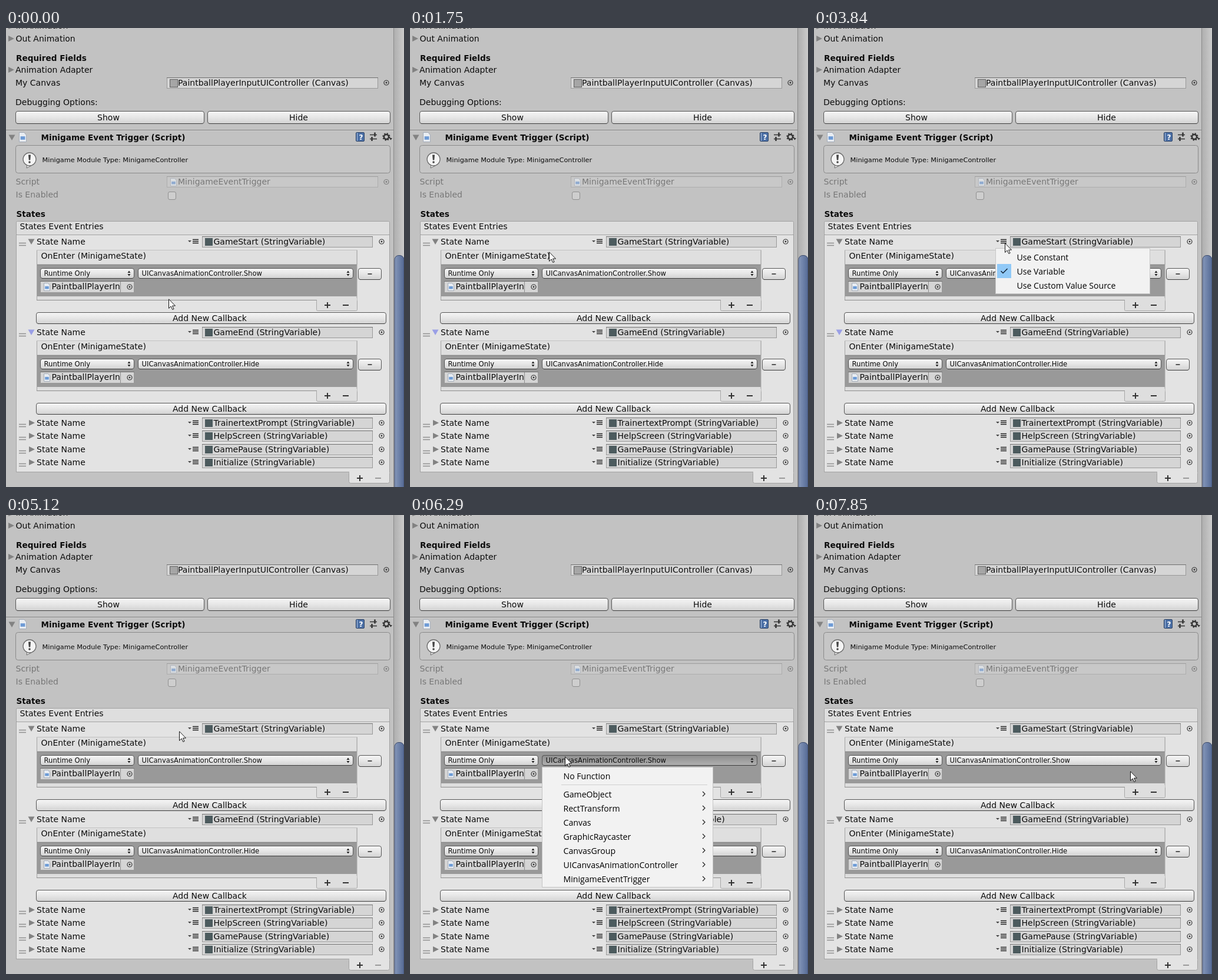
Recreate the animation shown at these times as an HTML page. Size 676 by 780 pixels, loop 8000 ms.

```html
<!DOCTYPE html>
<html lang="en">
<head>
<meta charset="utf-8">
<title>Inspector panel</title>
<style>
  html, body { margin: 0; width: 100%; height: 100%; overflow: hidden; background: #c2c2c2; }
  svg { display: block; width: 676px; height: 780px; }
  text { font: 14px "DejaVu Sans", sans-serif; fill: #0c0c0c; white-space: pre; }
  .bold { font-weight: bold; font-size: 13.6px; }
  .small { font-size: 11.3px; }
  .popup { font-size: 11.6px; }
  .dim { fill: #777; }
  .mid { text-anchor: middle; }
  .menu text { font: 14.1px "Open Sans", sans-serif; fill: #000; }
</style>
</head>
<body>
<svg id="stage" viewBox="0 0 676 780">
  <defs>
    <linearGradient id="btn" x2="0" y2="1">
      <stop offset="0" stop-color="#f6f6f6"/><stop offset=".5" stop-color="#e6e6e6"/><stop offset="1" stop-color="#d2d2d2"/>
    </linearGradient>
    <linearGradient id="down" x2="0" y2="1">
      <stop offset="0" stop-color="#8e8e8e"/><stop offset="1" stop-color="#b0b0b0"/>
    </linearGradient>
    <linearGradient id="track">
      <stop offset="0" stop-color="#adadad"/><stop offset="1" stop-color="#cbcbcb"/>
    </linearGradient>
    <linearGradient id="thumb">
      <stop offset="0" stop-color="#8496b8"/><stop offset=".45" stop-color="#6f83aa"/><stop offset="1" stop-color="#556a94"/>
    </linearGradient>
    <clipPath id="fieldClip"><rect x="58" y="0" width="136" height="780"/></clipPath>
  </defs>
</svg>
<script>
const LOOP = 8000;
const svg = document.getElementById('stage');
let layer = svg;

function add(tag, attrs, content) {
  const el = document.createElementNS('http://www.w3.org/2000/svg', tag);
  for (const k in attrs) el.setAttribute(k, attrs[k]);
  if (content) el.textContent = content;
  layer.append(el);
  return el;
}
function group(attrs, draw) {
  const g = add('g', attrs), outer = layer;
  layer = g;
  draw();
  layer = outer;
  return g;
}
const text = (x, y, s, cls = '', extra = {}) => add('text', { x, y, class: cls, ...extra }, s);
const rect = (x, y, w, h, fill, extra = {}) => add('rect', { x, y, width: w, height: h, fill, ...extra });
const path = (d, fill, extra = {}) => add('path', { d, fill, ...extra });
const line = (d, stroke, width = 1) => path(d, 'none', { stroke, 'stroke-width': width });

// Outlined box given by its outer pixel edges.
const box = (l, t, r, b, fill, stroke, rx = 0) =>
  rect(l + .5, t + .5, r - l - 1, b - t - 1, fill, { stroke, rx });

function button(l, t, r, b, fill = 'url(#btn)') {
  box(l, t, r, b, fill, '#555', 3.5);
  line(`M${l + 3} ${b - .5}H${r - 3}`, '#3c3c3c');
}
function picker(x, y, color = '#333') {
  add('circle', { cx: x, cy: y, r: 4, fill: 'none', stroke: color, 'stroke-width': 1.2 });
  add('circle', { cx: x, cy: y, r: 1.4, fill: color });
}
function field(l, t, r, b, dim) {
  box(l, t, r, b, dim ? '#c8c8c8' : '#d5d5d5', dim ? '#adadad' : '#999');
  line(`M${l} ${t + .5}H${r}`, dim ? '#9c9c9c' : '#6f6f6f');
}
function doc(x, y, w, h, alpha = 1) {
  group({ opacity: alpha }, () => {
    path(`M${x + .5} ${y + .5}h${w * .65}l${w * .35 - 1} ${w * .35}V${y + h - .5}H${x + .5}z`, '#e9edf2', { stroke: '#a2aab6' });
    rect(x + w * .2, y + h * .42, w * .6, h * .33, '#6d9bd6');
  });
}
const right = (x, y) => path(`M${x} ${y - 5}l10 5l-10 5z`, '#828282');
const down = (x, y) => path(`M${x} ${y - 4.5}h11l-5.5 9.5z`, '#828282');

function plus(x, y) { line(`M${x - 5} ${y}h10M${x} ${y - 5}v10`, '#333', 2); }
function minus(x, y, color = '#333') { line(`M${x - 5} ${y}h10`, color, 2); }

function popup(l, y, r, label, fill) {
  button(l, y - 9, r, y + 9, fill);
  text(l + 6.5, y + 4.2, label, 'popup');
  path(`M${r - 11.5} ${y - 1}l2.5 -3.5l2.5 3.5zm0 2l2.5 3.5l2.5 -3.5z`, '#222');
}

function stateRow(y, name, open) {
  line(`M22 ${y + 2.5}h12M22 ${y + 6.5}h12`, '#909090', 1.4);
  const arrow = open ? down(37.5, y) : right(39, y);
  text(52, y + 5, 'State Name');
  path(`M309 ${y - 2}h6l-3 3z`, '#444');
  line(`M317 ${y - 3.5}h10M317 ${y - .5}h10M317 ${y + 2.5}h10`, '#222', 1.6);
  field(333, y - 9, 623, y + 10);
  rect(338, y - 6, 13, 13, '#4c5b5e');
  text(352.5, y + 5, name + ' (StringVariable)');
  picker(638, y);
  return arrow;
}

function eventBox(y, fn) {
  box(52, y + 14, 597, y + 39, '#dfdfdf', '#c2c2c2');
  text(59.5, y + 29, 'OnEnter (MinigameState)');
  rect(52, y + 39, 544, 54, '#999');
  line(`M52 ${y + 39.5}H596`, '#868686');
  rect(52, y + 93, 544, 6, '#dedede');
  line(`M52.5 ${y + 15}V${y + 99}M596 ${y + 15}V${y + 99}`, '#a4a4a4');
  box(527, y + 98, 597, y + 118, '#dedede', '#a6a6a6', 2);
  line(`M52 ${y + 99.5}H528`, '#8c8c8c');
  rect(528, y + 96, 68, 5, '#dedede');
  plus(546, y + 108);
  minus(577, y + 108);

  popup(58, y + 54, 218, 'Runtime Only');
  popup(224, y + 54, 590, fn);
  button(598, y + 45, 638, y + 65);
  line(`M614.5 ${y + 55}h7`, '#222', 1.5);

  field(58, y + 67, 218, y + 87);
  doc(64, y + 70, 11, 14);
  text(77.5, y + 81, 'PaintballPlayerInput', '', { 'clip-path': 'url(#fieldClip)' });
  line(`M194.5 ${y + 68}v18`, '#8c8c8c');
  picker(210, y + 77);

  button(51, y + 120, 646, y + 140);
  text(346, y + 135, 'Add New Callback', 'mid');
}

function header() {
  text(16.5, 1, 'In Animation');
  path('M4 0h6l-6 2z', '#828282');
  right(4, 18);
  text(16.5, 23, 'Out Animation');
  text(17, 56, 'Required Fields', 'bold');
  right(4, 71);
  text(16, 76, 'Animation Adapter');
  text(16, 98, 'My Canvas');
  field(273, 84, 632, 103);
  box(278, 87, 292, 101, '#a6a6a6', '#5e5e5e');
  text(292, 98, 'PaintballPlayerInputUIController (Canvas)');
  picker(646, 93);
  text(16, 131, 'Debugging Options:');
  button(16, 141, 337, 163);
  text(174, 157, 'Show', 'mid');
  button(342, 141, 653, 163);
  text(497, 157, 'Hide', 'mid');

  line('M0 173.5H658', '#808080');
  line('M0 174.5H658', '#cfcfcf');
  down(4.5, 186);
  doc(22, 177, 13, 17);
  text(59.5, 191, 'Minigame Event Trigger (Script)', 'bold');
  box(594, 177, 609, 193, '#4c70a6', '#2b4266', 1.5);
  line('M596.5 178V192', '#a9bfdd');
  text(603, 189.5, '?', 'bold mid', { style: 'fill:#fff;font-size:12px' });
  line('M618 181.5h12M618 188.5h12', '#333', 1.5);
  line('M626.5 177.5v7M621.5 185v7', '#333', 2.5);
  add('circle', { cx: 646, cy: 185, r: 4, fill: 'none', stroke: '#333', 'stroke-width': 2.4 });
  add('circle', { cx: 646, cy: 185, r: 5.7, fill: 'none', stroke: '#333', 'stroke-width': 2, 'stroke-dasharray': '2.2 2.28' });
  path('M651 187h5l-2.5 3.5z', '#333');

  box(16, 199, 653, 247, '#c6c6c6', '#8a8a8a', 4);
  path('M36 232l-1 6l8 -4z', '#f4f4f4', { stroke: '#6c6c6c' });
  add('circle', { cx: 40, cy: 223, r: 11, fill: '#f4f4f4', stroke: '#6c6c6c', 'stroke-width': 1.3 });
  path('M38 215.5h4l-.8 9h-2.4z', '#444');
  add('circle', { cx: 40, cy: 228, r: 1.8, fill: '#444' });
  text(61.5, 228, 'Minigame Module Type: MinigameController', 'small', { fill: '#222' });

  text(16.5, 266, 'Script', 'dim');
  field(273, 252, 632, 271, true);
  doc(279, 255, 11, 14, .6);
  text(292, 266, 'MinigameEventTrigger', 'dim');
  picker(646, 261.5, '#7d7d7d');
  text(16.5, 288, 'Is Enabled', 'dim');
  box(275, 278, 289, 292, '#cecece', '#8f8f8f', 2.5);
  text(17.5, 321, 'States', 'bold');
}

function scrollbar() {
  rect(658, 0, 18, 780, 'url(#track)');
  line('M658.5 0V780', '#8b8b8b');
  rect(660, 386.5, 16, 420, 'url(#thumb)', { rx: 7, stroke: '#3c4b6c' });
}

function menu(l, t, r, b, items) {
  return group({ class: 'menu', opacity: 0 }, () => {
    box(l, t, r, b, '#f2f2f2', '#c6c6c6');
    items();
  });
}

// Repeats a table of [time, value] rows with hard changes.
function play(el, prop, rows) {
  const frames = rows.map(([t, v]) => ({ offset: t / LOOP, [prop]: v, easing: 'step-end' }));
  frames.push({ offset: 1, [prop]: rows[rows.length - 1][1] });
  el.animate(frames, { duration: LOOP, iterations: Infinity });
}

header();
box(17, 351, 652, 755, '#e3e3e3', '#a2a2a2');
box(17, 328, 652, 352, '#dedede', '#a2a2a2', 2);
text(23.5, 342, 'States Event Entries');
stateRow(363, 'GameStart', true);
eventBox(363, 'UICanvasAnimationController.Show');
const focusArrow = stateRow(517, 'GameEnd', true);
eventBox(517, 'UICanvasAnimationController.Hide');
stateRow(671, 'TrainertextPrompt');
stateRow(693, 'HelpScreen');
stateRow(716, 'GamePause');
stateRow(738, 'Initialize');
box(582, 753, 652, 774, '#e3e3e3', '#a2a2a2', 3);
rect(583, 752, 68, 4, '#e3e3e3');
plus(601, 765);
minus(632, 765, '#9a9a9a');
scrollbar();

const valueMenu = menu(308, 374, 571, 452, () => {
  rect(311, 401, 24, 24, '#91c9f7');
  line('M317.5 413l3.5 3.5l7.5 -7.5', '#123', 1.5);
  ['Use Constant', 'Use Variable', 'Use Custom Value Source']
    .forEach((s, i) => text(344.5, 395 + 24 * i, s));
});

const pressed = group({ opacity: 0 }, () =>
  popup(224, 417, 590, 'UICanvasAnimationController.Show', 'url(#down)'));

const functionMenu = menu(224, 428, 515, 633, () => {
  text(260.5, 449, 'No Function');
  line('M257 458.5H505', '#cfcfcf');
  ['GameObject', 'RectTransform', 'Canvas', 'GraphicRaycaster', 'CanvasGroup',
   'UICanvasAnimationController', 'MinigameEventTrigger'].forEach((s, i) => {
    const y = 475 + 24 * i;
    text(260.5, y + 5, s);
    line(`M497 ${y - 5}l4 4l-4 4`, '#222', 1.2);
  });
});

const cursor = path('M.5 .8V16.4l3.6 -3.5l2.7 5.6l2.3 -1.1l-2.6 -5.3h5z', '#fff',
  { stroke: '#111', 'stroke-linejoin': 'round' });

const moves = [
  [0, 276, 460], [960, 247, 460], [1160, 195, 437], [1340, 207, 405], [1520, 230, 384],
  [1750, 236, 380], [2590, 318, 378], [2770, 347, 367], [3510, 339, 365], [3840, 324, 365],
  [5120, 294, 367], [5320, 174, 366], [5500, 105, 364], [5680, 137, 384], [5860, 231, 406],
  [6060, 263, 410], [7490, 246, 410], [7670, 272, 414], [7850, 537, 435]
];
play(cursor, 'transform', moves.map(([t, x, y]) => [t, `translate(${x}px, ${y}px)`]));
play(focusArrow, 'fill', [[0, '#9a9fe6'], [5120, '#828282']]);
play(valueMenu, 'opacity', [[0, 0], [3840, 1], [5120, 0]]);
for (const el of [pressed, functionMenu]) play(el, 'opacity', [[0, 0], [6290, 1], [7490, 0]]);
</script>
</body>
</html>
```
